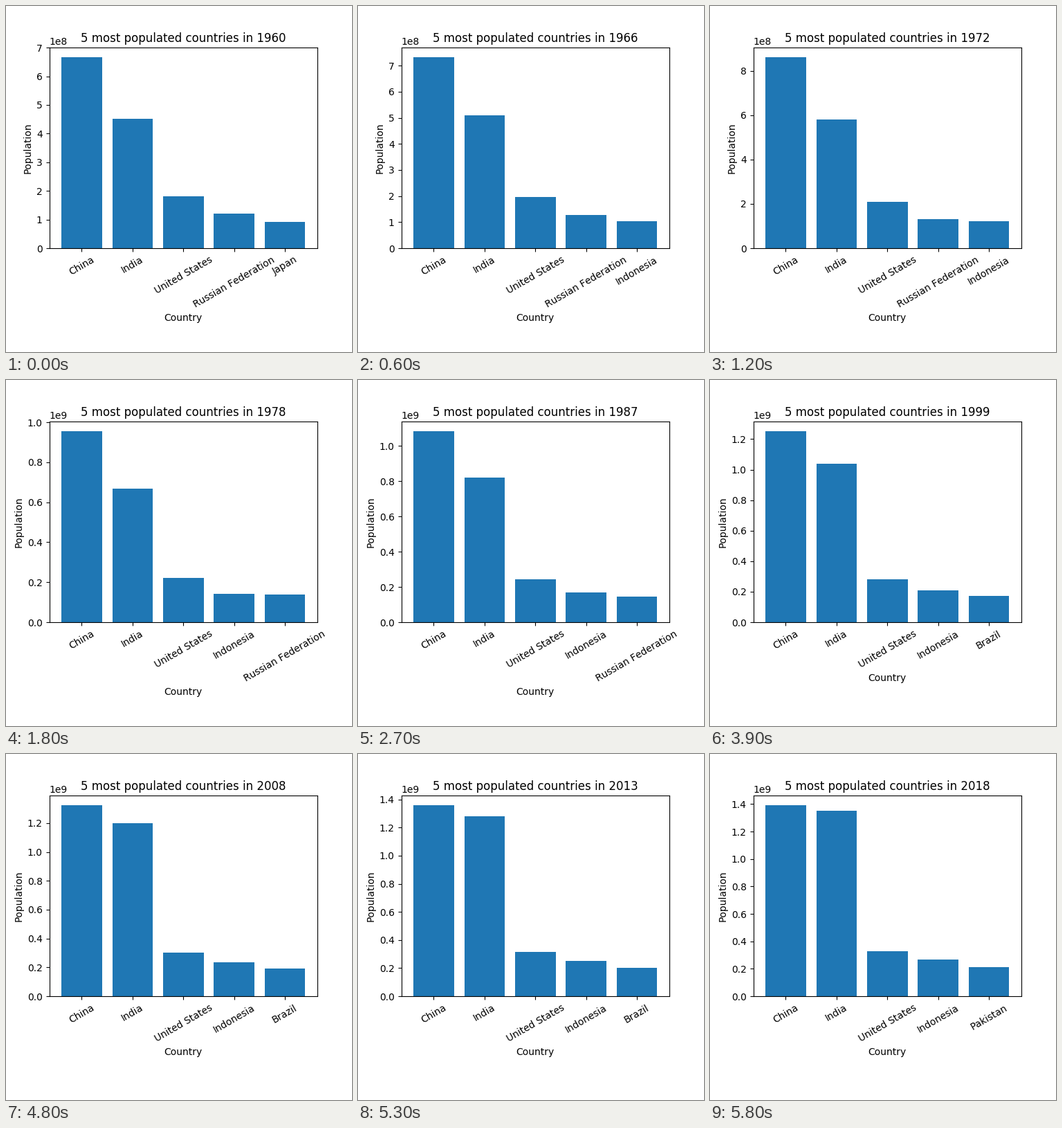
A matplotlib script that plays this animation: 500x500 px, repeating every 5900 ms.

```python
import matplotlib.pyplot as plt
import numpy as np
from matplotlib.animation import FuncAnimation

plt.rcParams["text.kerning_factor"] = 6

YEARS = np.arange(1960, 2019)


def growth(keys):
    """Smooth yearly population through a few {year: millions} points."""
    x = np.array(list(keys), float)
    y = np.array(list(keys.values()))
    slope = np.gradient(y, x, edge_order=2)
    k = np.clip(np.searchsorted(x, YEARS, "right") - 1, 0, len(x) - 2)
    h = x[k + 1] - x[k]
    t = (YEARS - x[k]) / h
    s = t * t * (3 - 2 * t)
    bend = h * t * (1 - t) * ((1 - t) * slope[k] - t * slope[k + 1])
    return 1e6 * (y[k] + s * (y[k + 1] - y[k]) + bend)


POPULATION = {
    "China": growth({1960: 667.07, 1961: 660.33, 1965: 715.19, 1972: 862.03,
                     1978: 956.17, 1987: 1084.04, 1999: 1252.74,
                     2008: 1324.66, 2018: 1392.73}),
    "India": growth({1960: 450.55, 1972: 581.09, 1987: 819.68, 1999: 1038.06,
                     2008: 1200.67, 2018: 1352.62}),
    "United States": growth({1960: 180.67, 1972: 209.9, 1987: 242.29,
                             1999: 279.04, 2018: 327.17}),
    "Russian Federation": growth({1960: 119.9, 1972: 131.91, 1978: 137.06,
                                  1990: 147.97, 2018: 144.48}),
    "Japan": growth({1960: 92.5, 1964: 97.83, 1972: 107.2, 2018: 126.5}),
    "Indonesia": growth({1960: 87.79, 1964: 97.64, 1978: 140.67, 1999: 208.6,
                         2018: 267.66}),
    "Brazil": growth({1960: 72.2, 1990: 149.0, 1999: 172.32, 2008: 192.03,
                      2018: 209.4}),
    "Pakistan": growth({1960: 45.0, 1990: 107.65, 2008: 171.65,
                        2018: 212.22}),
}

fig, ax = plt.subplots(figsize=(5, 5), dpi=100)
fig.subplots_adjust(left=0.125, right=0.9, bottom=0.3, top=0.88)


def draw(i):
    ax.clear()
    top5 = sorted(POPULATION, key=lambda c: -POPULATION[c][i])[:5]
    counts = [POPULATION[c][i] for c in top5]
    ax.bar(top5, counts, color="#1f77b4")

    top = counts[0] * 1.05
    step = 1e8 if top <= 9e8 else 2e8
    ax.set_ylim(0, top)
    ax.set_yticks(np.arange(0, top, step))
    ax.tick_params(axis="x", labelrotation=30)
    ax.set_title(f"5 most populated countries in {YEARS[i]}")
    ax.set_xlabel("Country")
    ax.set_ylabel("Population")


anim = FuncAnimation(fig, draw, frames=len(YEARS), interval=100, repeat=True)
plt.show()
```
